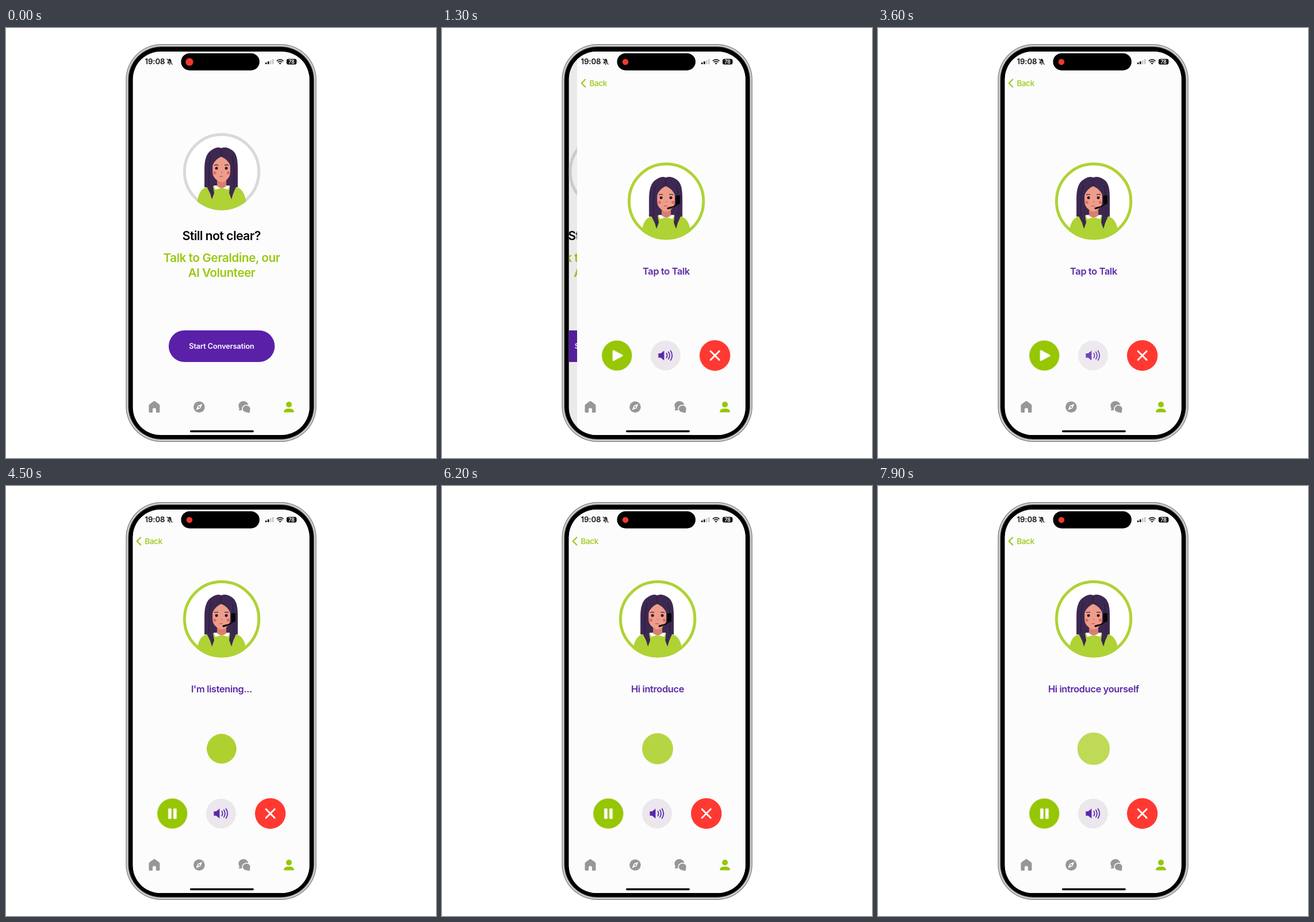
Animation, 748 px wide and 748 px high, one loop 8000 ms. Source, as an HTML page:

```html
<!DOCTYPE html>
<html lang="en">
<head>
<meta charset="utf-8">
<title>Voice helper</title>
<style>
  html, body { margin: 0; width: 100%; height: 100%; overflow: hidden; background: #fff; }
  svg { display: block; width: 100vw; height: 100vh; }
  text { font-family: Inter, Roboto, sans-serif; font-weight: 600; letter-spacing: -.025em; }
  .mid { text-anchor: middle; }
  .say { font-size: 16.5px; fill: #5a2aa6; text-anchor: middle; }
  .lime { fill: #9bc814; }
  .grey { fill: #979797; }

  .anim { animation: 8s linear infinite; }
  .first { animation-name: first; }
  .shade { animation-name: shade; }
  .second { animation-name: second; }
  .lift { animation-name: lift; }
  .left { animation-name: left; }
  .right { animation-name: right; }
  .sound { animation-name: sound; }
  .rec { animation-name: rec; transform-origin: 319px 59px; }
  .tap { animation-name: tap; }
  .listen { animation-name: listen; }
  .hi { animation-name: hi; animation-timing-function: step-end; }
  .intro { animation-name: intro; animation-timing-function: step-end; }
  .full { animation-name: full; animation-timing-function: step-end; }
  .play { animation-name: play; animation-timing-function: step-end; }
  .pause { animation-name: pause; animation-timing-function: step-end; }
  .show { animation-name: show; }
  .pulse { animation-name: pulse; transform-origin: 375px 457px; }

  /* screen push */
  @keyframes first {
    0%, 13% { transform: translateX(0); animation-timing-function: cubic-bezier(.2,.75,.25,1); }
    18.8%, 100% { transform: translateX(-92px); }
  }
  @keyframes shade {
    0%, 13% { opacity: 0; animation-timing-function: cubic-bezier(.2,.75,.25,1); }
    18.8%, 100% { opacity: .075; }
  }
  @keyframes second {
    0%, 13% { transform: translateX(307px); animation-timing-function: cubic-bezier(.2,.75,.25,1); }
    18.8%, 100% { transform: translateX(0); }
  }

  /* button row closes and opens around the sound button */
  @keyframes left {
    0%, 28.75% { transform: translateX(0); animation-timing-function: ease-in-out; }
    33.75%, 38% { transform: translateX(42.5px); animation-timing-function: ease-in-out; }
    43%, 100% { transform: translateX(0); }
  }
  @keyframes right {
    0%, 28.75% { transform: translateX(0); animation-timing-function: ease-in-out; }
    33.75%, 38% { transform: translateX(-42.5px); animation-timing-function: ease-in-out; }
    43%, 100% { transform: translateX(0); }
  }
  @keyframes sound {
    0%, 27.5% { opacity: 1; }
    30.9%, 39.5% { opacity: 0; animation-timing-function: ease-out; }
    47.5%, 100% { opacity: 1; }
  }

  /* listening state */
  @keyframes lift {
    0%, 50.6% { transform: translateY(0); animation-timing-function: ease-in-out; }
    55.5%, 100% { transform: translateY(-70px); }
  }
  @keyframes tap { 0%, 50.6% { opacity: 1; } 53%, 100% { opacity: 0; } }
  @keyframes listen {
    0%, 51.5% { opacity: 0; }
    54.5%, 72.4% { opacity: 1; }
    72.41%, 100% { opacity: 0; }
  }
  @keyframes hi { 0% { opacity: 0; } 72.4% { opacity: 1; } 75.5%, 100% { opacity: 0; } }
  @keyframes intro { 0% { opacity: 0; } 75.5% { opacity: 1; } 85%, 100% { opacity: 0; } }
  @keyframes full { 0% { opacity: 0; } 85%, 100% { opacity: 1; } }
  @keyframes play { 0% { opacity: 1; } 51.2%, 100% { opacity: 0; } }
  @keyframes pause { 0% { opacity: 0; } 51.2%, 100% { opacity: 1; } }
  @keyframes show { 0%, 51.5% { opacity: 0; } 55%, 100% { opacity: 1; } }
  @keyframes pulse {
    0%, 51% { transform: scale(1.18); opacity: .68; animation-timing-function: ease-out; }
    59.2%, 82.3% { transform: scale(1); opacity: 1; animation-timing-function: cubic-bezier(.37,0,.63,1); }
    70.8% { transform: scale(1.22); opacity: .6; animation-timing-function: cubic-bezier(.37,0,.63,1); }
    93.9% { transform: scale(1.22); opacity: .6; animation-timing-function: ease-in; }
    100% { transform: scale(1.095); opacity: .83; }
  }
  @keyframes rec { 0%, 1% { transform: scale(1.28); } 6%, 100% { transform: scale(1); } }
</style>
</head>
<body>
<svg viewBox="0 0 748 748">
  <defs>
    <clipPath id="screen"><rect x="220.700" y="41" width="307" height="667" rx="48"/></clipPath>
    <clipPath id="disc"><circle r="67"/></clipPath>

    <g id="girl">
      <path fill="#3c2850" d="M-30 27V-4C-30-22-26-31-20-36C-13-41-7-44-1-41C6-44 14-41 20-36C26-30 28-22 28-4V27Z"/>
      <path clip-path="url(#disc)" fill="#afd235" d="M-43 53C-39 33-34 27-20 26L-14 25H14L20 26C33 27 39 33 43 53V70H-43Z"/>
      <path fill="#fff" d="M-14 24L-11 31L0 28L11 31L14 24Z"/>
      <path fill="#d97f70" d="M-8 12H8V25Q0 32-8 25Z"/>
      <path fill="#ef9d8b" d="M-16-10C-14-17-8-23-1-26C7-23 13-17 15-10V2Q14 11 5 17Q0 19-5 17Q-15 11-16 2Z"/>
      <path fill="#3c2850" d="M-27-12L-16-12V20L-13 37L-17 48L-20 38L-27 24ZM26-12L15-12V20L13 37L17 48L20 38L26 24Z"/>
      <path fill="none" stroke="#2a1a3b" d="M-1-40V-27M-18-28Q-24-8-22 25M18-28Q23-8 21 25"/>
      <g fill="#2b1930">
        <circle cx="-9" cy="-6" r="2.500"/><circle cx="8" cy="-6" r="2.500"/>
      </g>
      <path fill="none" stroke="#4a2634" stroke-width="1.300" d="M-13-11Q-9-13-6-11M5-11Q8-13 12-11"/>
      <g fill="#e5695f"><circle cx="-12" cy="2" r="2.700"/><circle cx="11.500" cy="2" r="2.700"/></g>
      <path fill="none" stroke="#bb5750" stroke-width="1.300" d="M-4 8.500Q-1 7.500 2 8.500M-1 1H1"/>
    </g>

    <path id="speaker" d="M-12.500-3.800H-8.500L-2.500-8.500V8.500L-8.500 3.800H-12.500Z"/>
  </defs>

  <!-- phone body -->
  <rect x="208.400" y="28" width="331.600" height="692" rx="62" fill="#858583"/>
  <rect x="209.800" y="29.400" width="328.800" height="689.200" rx="60.600" fill="#d2d2d0"/>
  <rect x="212.300" y="32" width="323.800" height="684" rx="58" fill="#555"/>
  <rect x="213.500" y="33.200" width="321.400" height="681.600" rx="56.800" fill="#000"/>

  <g clip-path="url(#screen)">
    <rect x="220" y="41" width="308" height="667" fill="#fcfcfc"/>

    <g class="anim first">
      <g transform="translate(375.200 250)">
        <circle r="64.700" fill="#fff" stroke="#d9d9d9" stroke-width="5"/>
        <use href="#girl"/>
      </g>
      <text class="mid" x="374.800" y="369" font-size="21.200">Still not clear?</text>
      <g class="mid lime" font-size="20.700">
        <text x="375.200" y="407" style="letter-spacing:-.02em">Talk to Geraldine, our</text>
        <text x="375.200" y="433">AI Volunteer</text>
      </g>
      <rect x="283" y="526" width="184.500" height="55" rx="27.500" fill="#5a21a8"/>
      <text class="mid" x="375" y="558" font-size="12.800" fill="#fff" style="letter-spacing:-.01em">Start Conversation</text>
    </g>
    <rect class="anim shade" x="220" y="41" width="308" height="667" opacity="0"/>

    <g class="anim second">
      <rect x="220" y="41" width="308" height="667" fill="#fcfcfc"/>
      <path d="M234.300 89.500L227.800 96L234.300 102.500" fill="none" stroke="#9bc814" stroke-width="2.200" stroke-linecap="round" stroke-linejoin="round"/>
      <text class="lime" x="241.500" y="100.700" font-size="13.500" style="font-weight:500">Back</text>

      <g class="anim lift">
        <g transform="translate(375.200 301.300)">
          <circle r="64.700" fill="#fff" stroke="#afd235" stroke-width="5"/>
          <use href="#girl"/>
          <rect x="16.500" y="-10" width="7.500" height="15" rx="1.500" fill="#080808"/>
          <path d="M20 4Q17 9 4 12" fill="none" stroke="#080808" stroke-width="2.200" stroke-linecap="round"/>
          <path d="M3 12.500L9 11" stroke="#080808" stroke-width="3.200" stroke-linecap="round"/>
        </g>
        <g class="say">
          <text class="anim tap" x="375" y="429">Tap to Talk</text>
          <text class="anim listen" x="375" y="429">I'm listening...</text>
          <text class="anim hi" x="375" y="429">Hi</text>
          <text class="anim intro" x="375" y="429">Hi introduce</text>
          <text class="anim full" x="375" y="429">Hi introduce yourself</text>
        </g>
      </g>

      <g class="anim show">
        <circle class="anim pulse" cx="375" cy="457" r="25" fill="#a9cf22"/>
      </g>

      <g class="anim sound">
        <g transform="translate(374 569.700)">
          <circle r="26" fill="#ebe7ed"/>
          <g fill="#5a27ad"><use href="#speaker"/></g>
          <path d="M1.500-4Q4 0 1.500 4M5-6.200Q9 0 5 6.200M8.700-8.200Q14 0 8.700 8.200" fill="none" stroke="#5a27ad" stroke-width="1.800" stroke-linecap="round"/>
        </g>
      </g>
      <g class="anim left">
        <g transform="translate(289.300 569.700)">
          <circle r="26.200" fill="#96c604"/>
          <path class="anim play" d="M-6-8L9 0L-6 8Z" fill="#fff" stroke="#fff" stroke-width="3" stroke-linejoin="round"/>
          <g class="anim pause" fill="#fff">
            <rect x="-7.200" y="-8.800" width="5.700" height="18" rx="1"/>
            <rect x="1.800" y="-8.800" width="5.700" height="18" rx="1"/>
          </g>
        </g>
      </g>
      <g class="anim right">
        <g transform="translate(459.800 569.700)">
          <circle r="26.700" fill="#ff3931"/>
          <path d="M-7.500-7.500L7.500 7.500M7.500-7.500L-7.500 7.500" stroke="#fff" stroke-width="3" stroke-linecap="round"/>
        </g>
      </g>
    </g>

    <!-- tab bar -->
    <path class="grey" d="M248.500 657Q248.500 655.500 250 654.300L256.500 649.600Q258 648.500 259.500 649.600L266 654.300Q267.500 655.500 267.500 657V667.500Q267.500 669 266 669H261V663.500Q261 661 258 661Q255 661 255 663.500V669H250Q248.500 669 248.500 667.500Z"/>
    <circle class="grey" cx="336" cy="659.300" r="9.800"/>
    <path d="M341.500 653.800L338.300 661.600L330.500 664.800L333.700 657Z" fill="#fcfcfc"/>
    <circle cx="336" cy="659.300" r="1.500" class="grey"/>
    <path class="grey" d="M404.500 656.500A8.500 7.500 0 1 1 413 664Q408 666 404.500 665Q406.500 663 405.700 661Q404.500 659 404.500 656.500Z"/>
    <path class="grey" stroke="#fcfcfc" stroke-width="1.500" d="M425.500 662.500A7.200 6.500 0 1 0 418 669Q422 670.500 425.800 669.500Q424 667.800 424.800 666Q425.500 664.500 425.500 662.500Z"/>
    <g fill="#96c604">
      <circle cx="492.200" cy="655" r="5"/>
      <path d="M483.300 668.500V667Q484 662 492.200 662Q500.500 662 501 667V668.500Z"/>
    </g>
    <rect x="320" y="699.800" width="111" height="3.400" rx="1.700" fill="#0a0a0a"/>

    <!-- status bar -->
    <rect x="304.500" y="44" width="136.500" height="29.700" rx="14.850"/>
    <circle class="anim rec" cx="319" cy="59" r="5.300" fill="#f1392d"/>
    <text x="241.500" y="63.300" font-size="13.300" fill="#151515" style="letter-spacing:-.01em">19:08</text>
    <g transform="translate(-.5 0)">
      <path fill="#222" d="M280.800 61.500Q282 60 282 57.500Q282 54 285 53.500Q288 54 288 57.500Q288 60 289.200 61.500ZM283.500 62.200H286.500Q286 64 285 64Q284 64 283.500 62.200Z"/>
      <path d="M280 53.500L290 64" stroke="#fcfcfc" stroke-width="2.300"/>
      <path d="M280.300 53.500L290 63.500" stroke="#222" stroke-width="1.100"/>
    </g>
    <g fill="#151515">
      <rect x="451" y="60" width="2.700" height="3" rx=".7"/>
      <rect x="455" y="58" width="2.700" height="5" rx=".7"/>
      <g fill="#c8c8c8">
        <rect x="459" y="56" width="2.700" height="7" rx=".7"/>
        <rect x="463" y="54" width="2.700" height="9" rx=".7"/>
      </g>
      <path d="M476.800 63.500L474.700 61.300Q476.800 59.600 478.900 61.300Z"/>
      <path d="M473 59.600Q476.800 56.600 480.600 59.600M471 57.300Q476.800 52.500 482.600 57.300" fill="none" stroke="#151515" stroke-width="1.800"/>
      <rect x="488" y="53.800" width="17.500" height="9.700" rx="3"/>
      <path d="M506.300 57Q508 58.600 506.300 60.300Z" fill="#999"/>
    </g>
    <text class="mid" x="496.600" y="61.900" font-size="8.800" fill="#fff">78</text>
  </g>
</svg>
</body>
</html>
```
